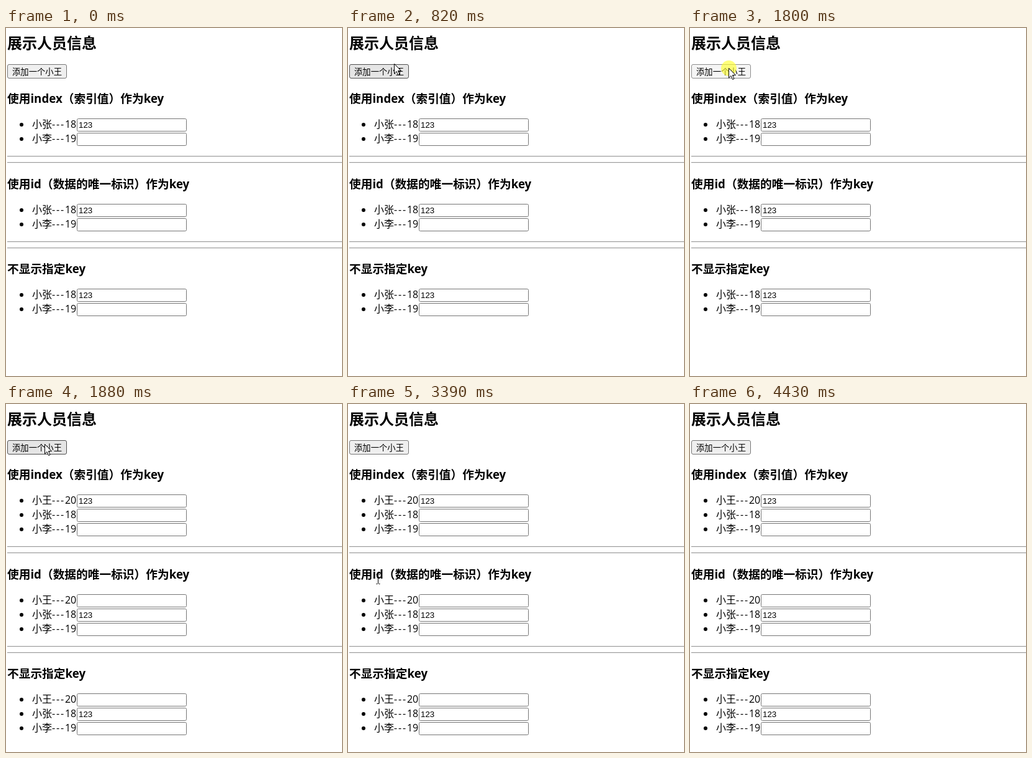
An HTML page for the animation above (4930 ms loop, 541 by 558 pixels).

```html
<!DOCTYPE html>
<html lang="zh-CN">
<head>
<meta charset="utf-8">
<style>
  html, body { margin: 0; width: 100%; height: 100%; overflow: hidden; background: #fff; }
  svg { display: block; }
  text { font: 16px "Open Sans", "Noto Sans CJK SC", "Noto Sans CJK", sans-serif; white-space: pre; }
  .h2 { font-size: 24px; font-weight: bold; }
  .h3 { font-size: 18.72px; font-weight: bold; }
  .label { font-size: 13.333px; }
  .value { font: 13.333px "Liberation Sans", Arial, sans-serif; }
  .dash { letter-spacing: 1.8px; }
  .field { fill: #fff; stroke: #767676; }
</style>
</head>
<body>
<svg width="541" height="558" viewBox="0 0 541 558">
  <text class="h2" x="2" y="32.5">展示人员信息</text>
  <rect id="button" x="2.5" y="58.5" width="95" height="22" rx="2.5"/>
  <text class="label" x="10" y="75">添加一个小王</text>
  <g id="before"></g>
  <g id="after"></g>
  <circle id="click" cx="62.5" cy="64.5" r="12.5" fill="#ff3" fill-opacity=".65"/>
  <g id="cursor">
    <path id="arrow" d="M.5 .5V16L4 12.6 6.6 18.5 9 17.5 6.5 11.7H11.5Z" fill="#fff" stroke="#000"/>
    <path id="beam" d="M-3 -7.5H-1M1 -7.5H3M-3 7.5H-1M1 7.5H3M0 -7V7" fill="none" stroke="#000"/>
  </g>
</svg>
<script>
const $ = id => document.getElementById(id);
const LOOP = 4930, CLICK = 1720, ADDED = 1880, ENTER = 310, LEAVE = 4430;
const titles = ['使用index（索引值）作为key', '使用id（数据的唯一标识）作为key', '不显示指定key'];
const people = [['小张', 18], ['小李', 19]];

function row(y, [name, age], value) {
  return `<circle cx="25" cy="${y + 10}" r="3"/>
    <text x="42" y="${y + 15}">${name}<tspan class="dash">---</tspan>${age}</text>
    <rect class="field" x="114.5" y="${y + .5}" width="176" height="20" rx="2"/>
    <text class="value" x="117" y="${y + 15}">${value}</text>`;
}

function rule(y) {
  return `<path d="M2 ${y + .5}H541" stroke="#9a9a9a"/><path d="M2 ${y + 1.5}H541" stroke="#eee"/>`;
}

// filled[g] is the row holding the typed value in section g
function page(list, filled) {
  const pitch = 90.33 + 23 * list.length;
  return titles.map((title, g) => {
    const y = Math.ceil(pitch * g), end = y + 159 + 23 * list.length;
    return `<text class="h3" x="2" y="${y + 120}">${title}</text>` +
      list.map((p, i) => row(y + 145 + 23 * i, p, i === filled[g] ? '123' : '')).join('') +
      (g < 2 ? rule(end) + rule(end + 10) : '');
  }).join('');
}

$('before').innerHTML = page(people, [0, 0, 0]);
$('after').innerHTML = page([['小王', 20], ...people], [0, 1, 1]);

// Mouse strokes: start, end, steps, then start, control and end points of a curve
const strokes = [
  [310, 820, 7, [328, 436], [120, 120], [74, 57]],
  [900, 1140, 4, [72, 56], [66, 58], [62, 64]],
  [2790, 3300, 7, [58, 80], [50, 376], [48, 277]],
  [3390, 3780, 6, [48, 281], [66, 312], [65, 343]],
  [3950, 4430, 7, [70, 345], [200, 390], [450, 600]]
];

function mouse(t) {
  const [t0, t1, n, a, b, c] = strokes.findLast(s => t >= s[0]) || strokes[0];
  const k = Math.floor((t - t0) / (t1 - t0) * (n - 1) + .01);
  const u = Math.max(0, Math.min(1, k / (n - 1))), v = 1 - u;
  return a.map((p, i) => Math.round(v * v * p + 2 * u * v * b[i] + u * u * c[i]));
}

const show = (id, on) => $(id).setAttribute('visibility', on ? 'visible' : 'hidden');

function draw(t) {
  const [x, y] = mouse(t);
  const inside = t >= ENTER && t < LEAVE;
  const pressed = t >= CLICK && t < ADDED;
  const hover = inside && x < 98 && y >= 55 && y <= 81;
  const overText = t > 2790 && x < 291 && y > 258 && y < 373;
  const [fill, stroke] = pressed ? ['#f5f5f5', '#8d8d8d'] : hover ? ['#e5e5e5', '#4f4f4f'] : ['#efefef', '#767676'];
  $('button').setAttribute('fill', fill);
  $('button').setAttribute('stroke', stroke);
  show('before', t < ADDED);
  show('after', t >= ADDED);
  show('click', pressed);
  show('arrow', inside && !overText);
  show('beam', inside && overText);
  $('cursor').setAttribute('transform', `translate(${x + (overText ? .5 : 0)} ${y})`);
}

const start = performance.now();
function tick() {
  draw((performance.now() - start) % LOOP);
  requestAnimationFrame(tick);
}
tick();
</script>
</body>
</html>
```
